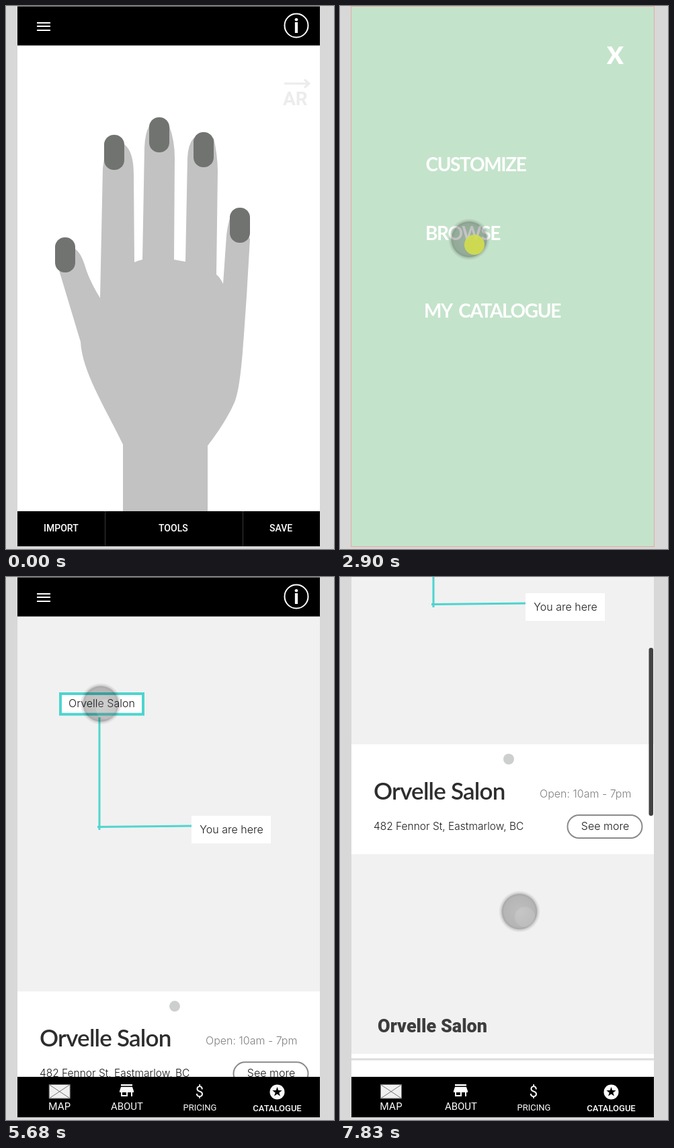
Write an HTML page that moves like this. It is 488 px wide and 805 px high and loops after 8 s.

```html
<!DOCTYPE html>
<html lang="en">
<head>
<meta charset="utf-8">
<title>Nail app prototype</title>
<style>
  html, body { margin: 0; width: 100%; height: 100%; overflow: hidden; background: #d8d8d8; }
  svg { display: block; }
  text { white-space: pre; }
  .ui { font: 500 14px Roboto, sans-serif; fill: #fff; }
  .body { font: 300 16px Inter, sans-serif; fill: #1c1c1c; }
  .menu { font: 700 28px Lato, sans-serif; letter-spacing: -1.35px; fill: #fff; }
  .mid { text-anchor: middle; }
  .teal { stroke: #4dd4cf; stroke-width: 3; fill: none; }
</style>
</head>
<body>
<svg width="488" height="805" viewBox="0 0 488 805">
  <defs>
    <clipPath id="phone"><rect x="17" width="450" height="801"/></clipPath>
    <radialGradient id="disc">
      <stop offset="0" stop-opacity=".21"/>
      <stop offset=".74" stop-opacity=".25"/>
      <stop offset=".82" stop-opacity=".3"/>
      <stop offset=".88" stop-opacity=".13"/>
      <stop offset="1" stop-opacity="0"/>
    </radialGradient>
    <g id="header">
      <rect x="17" width="450" height="58.5"/>
      <path d="M17 .5H467" stroke="#777"/>
      <path d="M46 25H66M46 30H66M46 36H66" stroke="#fff" stroke-width="2"/>
      <circle cx="432" cy="29" r="17.5" fill="none" stroke="#fff" stroke-width="2"/>
      <text class="mid" x="432" y="40" font-family="Roboto, sans-serif" font-weight="700" font-size="30" fill="#fff">i</text>
    </g>
  </defs>

  <rect width="488" height="805" fill="#d8d8d8"/>

  <g id="hand" clip-path="url(#phone)">
    <rect x="17" width="450" height="801" fill="#fff"/>
    <g stroke="#ececec" stroke-width="3" fill="none">
      <path d="M414 115H450M444 109L451 115L444 121"/>
    </g>
    <text x="412" y="147" font-family="Roboto, sans-serif" font-weight="700" font-size="28" fill="#ececec">AR</text>
    <path fill="#c2c2c2" d="M174 749V650C150 600 113 542 111 498L79 392L88 355L103 360C112 367 116 380 120 393
      C128 414 135 424 140 433L144 240L148 215L165 205L176 205C186 213 190 228 190 250L191 380Q197 377 203 376
      L206 210Q207 188 213 178L243 178Q251 200 251 225L250 376L267 379L270 225Q271 205 279 196L309 196
      Q315 222 315 245L313 398Q319 403 323 412L328 340Q330 323 334 312L363 345L358 430
      C353 500 350 560 341 585C333 605 315 633 300 652V749Z"/>
    <g id="nails" fill="#717371"></g>
    <use href="#header"/>
    <rect x="17" y="749" width="450" height="52"/>
    <path d="M147.5 749V801M352.5 749V801" stroke="#3a3a3a"/>
    <g class="ui">
      <text x="56" y="779">IMPORT</text>
      <text x="227" y="779">TOOLS</text>
      <text x="392" y="779">SAVE</text>
    </g>
  </g>

  <g id="menu">
    <rect x="16.5" y=".5" width="451" height="801" fill="#c4e3cb" stroke="#e3aaa4"/>
    <g class="menu">
      <text x="397" y="86" style="font-size:36px;font-weight:900">X</text>
      <text x="127.5" y="245">CUSTOMIZE</text>
      <text x="127" y="347">BROWSE</text>
      <text x="125" y="462" word-spacing="5">MY CATALOGUE</text>
    </g>
  </g>

  <g id="map" clip-path="url(#phone)">
    <rect x="17" width="450" height="801" fill="#f1f1f1"/>
    <g id="page">
      <use href="#header"/>
      <rect x="81" y="173" width="123" height="30.5" fill="#fff" stroke="#4dd4cf" stroke-width="4"/>
      <text class="body mid" x="142.5" y="193">Orvelle Salon</text>
      <path id="route" class="teal" d="M139 208V375M136 370.5L277 369"/>
      <rect x="276" y="354" width="118" height="41" fill="#fff"/>
      <text class="body mid" x="335.5" y="380">You are here</text>
      <g id="panel">
        <rect x="17" y="578" width="450" height="163" fill="#fff"/>
        <circle cx="251" cy="600" r="8" fill="#cdcfcf"/>
        <text x="50" y="660" font-family="Lato, sans-serif" font-weight="600" font-size="35" letter-spacing="-.8" fill="#2d2d2d">Orvelle Salon</text>
        <text class="body" x="297" y="657" style="fill:#808080">Open: 10am - 7pm</text>
        <text class="body" x="50" y="705" style="font-size:15.5px">482 Fennor St, Eastmarlow, BC</text>
        <rect x="338.5" y="683" width="111" height="34" rx="17" fill="#fff" stroke="#8a8a8a" stroke-width="2"/>
        <text class="body mid" x="394.5" y="705">See more</text>
      </g>
      <text x="56" y="1005" font-family="Roboto, sans-serif" font-weight="800" font-size="27" fill="#3d3d3d">Orvelle Salon</text>
      <rect x="17" y="1037" width="450" height="200" fill="#fff"/>
      <path d="M17 1045H467" stroke="#dcdcdc" stroke-width="3"/>
    </g>
    <rect id="bar" x="459.5" width="6.5" height="249" rx="3" fill="#424242"/>
    <rect x="17" y="741" width="450" height="60"/>
    <g id="mapTab">
      <path d="M.5 752.5H31.5V773H.5ZL31.5 773M31.5 752.5L.5 773" fill="#f0f0f0" stroke="#777"/>
      <text class="body mid" x="16" y="790" style="font-size:15px;font-weight:400;fill:#fff">MAP</text>
    </g>
    <g id="tabs" class="ui mid">
      <path fill-rule="evenodd" d="M171 752H188V754.5H171ZM171 756H188L190 762V764H188V770H186V764H181V770H171V764H169V762ZM173 764V768H179V764Z"/>
      <text x="180" y="790" style="font-size:15px;font-weight:400">ABOUT</text>
      <text x="288" y="771" style="font-size:22px;font-weight:400">$</text>
      <text x="288.5" y="791" style="font-size:13px;font-weight:400">PRICING</text>
      <circle cx="403.5" cy="763.5" r="11"/>
      <path id="star" fill="#000"/>
      <text x="403.5" y="792" style="font-size:13px">CATALOGUE</text>
    </g>
  </g>

  <g id="cursor">
    <circle r="31" fill="url(#disc)"/>
    <circle id="dot" cx="8" cy="8" r="15"/>
  </g>
</svg>
<script>
const LOOP = 8000;
const el = id => document.getElementById(id);
const set = (id, name, value) => el(id).setAttribute(name, value);
const ramp = (t, a, b) => Math.min(1, Math.max(0, (t - a) / (b - a)));
const smooth = u => u * u * (3 - 2 * u);
const within = (t, spans) => spans.some(([a, b]) => t >= a && t < b);

// time, x, y
const path = [
  [460, 79, 45], [830, 58, 30],
  [1680, 58, 30], [1760, 92, 65], [1850, 140, 130], [1950, 164, 195], [2050, 174, 265],
  [2150, 182, 350], [2270, 200, 427],
  [2400, 200, 427], [2520, 192, 346],
  [3470, 192, 346], [3540, 186, 325], [3680, 137, 180], [3830, 133, 164], [4060, 140, 183], [4230, 141, 188],
  [6150, 141, 188], [6300, 185, 380], [6430, 264, 620], [6520, 296, 693], [6600, 298, 708],
  [6780, 282, 610], [6970, 267, 496]
];
const clicks = [[830, 1000], [2670, 2960], [5150, 5360]];
const barTimes = [[3290, 3520], [5830, 6290], [7140, LOOP]];

function cursorAt(t) {
  const i = path.findIndex(p => p[0] > t);
  if (i < 0) return path[path.length - 1].slice(1);
  if (i === 0) return path[0].slice(1);
  const [a, b] = [path[i - 1], path[i]];
  const u = ramp(t, a[0], b[0]);
  return [a[1] + (b[1] - a[1]) * u, a[2] + (b[2] - a[2]) * u];
}

el('nails').innerHTML = [[73, 343], [146, 191], [213, 165], [279, 187], [333, 299]]
  .map(([x, y]) => `<rect x="${x}" y="${y}" width="30" height="52" rx="14.5"/>`).join('');

set('star', 'd', 'M' + Array.from({ length: 10 }, (_, i) => {
  const r = i % 2 ? 3 : 7.5, a = i * Math.PI / 5;
  return `${403.5 + r * Math.sin(a)} ${763.5 - r * Math.cos(a)}`;
}).join('L') + 'Z');

function draw(t) {
  const mapShown = ramp(t, 2930, 3130);
  set('menu', 'opacity', mapShown < 1 ? ramp(t, 950, 1380) : 0);
  set('map', 'opacity', mapShown);

  const u = ramp(t, 5300, 5830);
  const shown = 1 - (1 - u) ** 3;
  set('route', 'opacity', shown);
  set('tabs', 'opacity', shown);
  set('mapTab', 'transform', `translate(${226.5 - 166.5 * shown})`);
  set('panel', 'transform', `translate(0 ${460 * (1 - u) ** 2})`);

  const scroll = 330 * smooth(ramp(t, 7080, 7830));
  set('page', 'transform', `translate(0 ${-scroll})`);
  set('bar', 'y', 2 + scroll * 0.312);
  set('bar', 'opacity', within(t, barTimes) ? 1 : 0);

  const pressed = within(t, clicks);
  set('cursor', 'transform', `translate(${cursorAt(t)})`);
  set('cursor', 'opacity', t < 460 ? 0 : 1);
  set('dot', 'fill', pressed ? '#d3dc4c' : '#fff');
  set('dot', 'opacity', pressed ? 0.92 : 0.12);
}

const start = performance.now();
function frame() {
  draw((performance.now() - start) % LOOP);
  requestAnimationFrame(frame);
}
frame();
</script>
</body>
</html>
```
